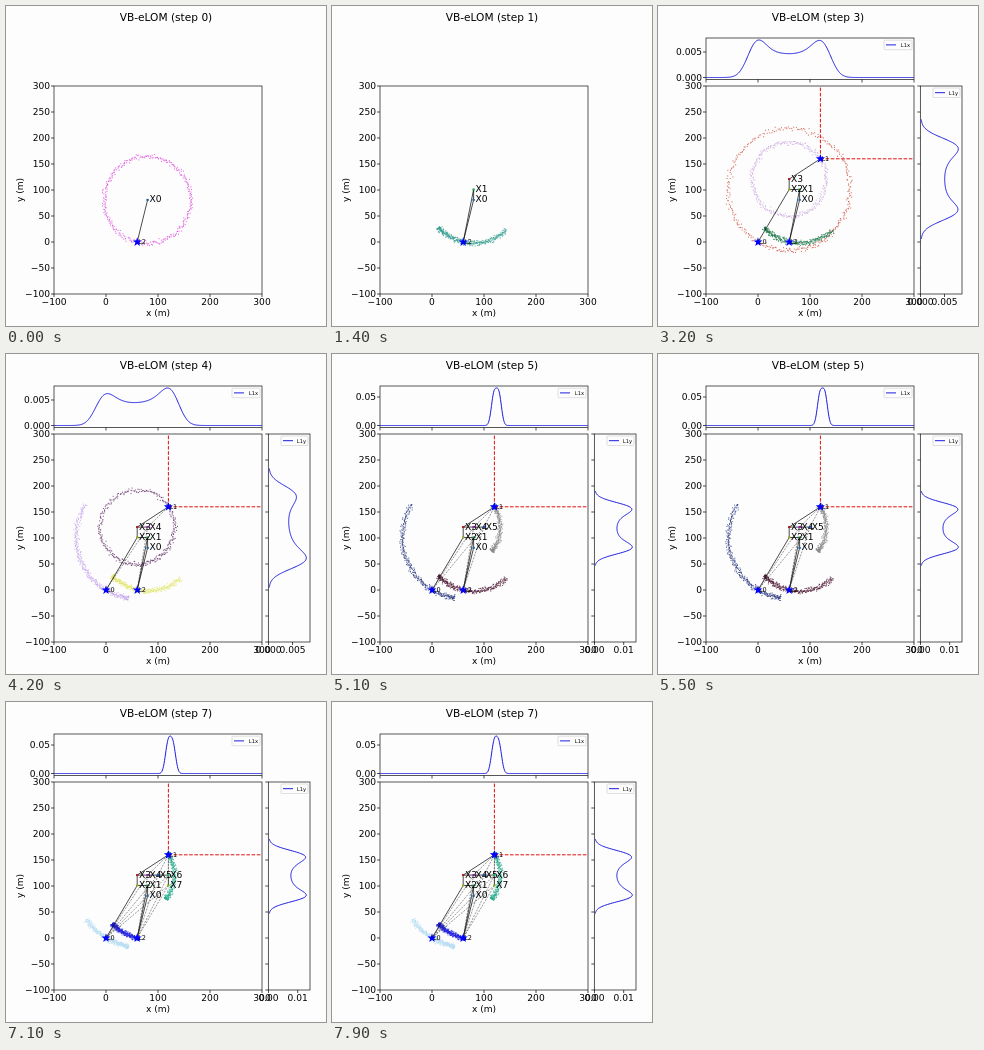
Animation, 320 px wide and 320 px high, one loop 8000 ms. Source, as an HTML page with a canvas:

```html
<!DOCTYPE html>
<html>
<head>
<meta charset="utf-8">
<style>
html, body { margin: 0; width: 100%; height: 100%; overflow: hidden; background: #fdfdfd; }
canvas { display: block; width: 320px; height: 320px; }
</style>
</head>
<body>
<canvas></canvas>
<script>
const LOOP = 8000, STEP_MS = 900, FIRST_MS = 300, LAST_STEP = 7;
const FONT = '"DejaVu Sans", Verdana, sans-serif';
const PAPER = '#fdfdfd', CURVE = '#1c1ce0', RAD = Math.PI / 180;

// world metres to stage pixels
const px = x => 100 + 0.52 * x;
const py = y => 236 - 0.52 * y;

// the robot drives 20 m per step: up, left, up, right ...
const MOVES = { U: [0, 20], D: [0, -20], L: [-20, 0], R: [20, 0] };
let spot = [80, 81];
const poses = [spot];
for (const m of 'ULURRRD') poses.push(spot = spot.map((v, i) => v + MOVES[m][i]));

// each landmark is a ring around the pose that saw it, later an arc, then a shorter arc
const landmarks = [
  { at: [0, 0], seen: 2, arc: 4, settle: 7, from: 98, sweep: 115,
    colors: ['#b4ee3c', '#c8402c', '#c3a0ea', '#22307a', '#a9bda4', '#b4dcf2'] },
  { at: [120, 160], seen: 3, arc: 5, settle: 9, from: -36, sweep: 76, ends: true,
    colors: ['#c9a0dc', '#5a2560', '#8c8c8c', '#e0a030', '#2fae90'] },
  { at: [60, 0], seen: 0, arc: 1, settle: 6, from: 137, sweep: -90,
    colors: ['#d93ad9', '#2a9a8a', '#8a1ee6', '#1f7a4a', '#e2e66a', '#4e1834', '#a8622a', '#1f1fdc'] }
];

const canvas = document.querySelector('canvas');
const c = canvas.getContext('2d');
const scale = window.devicePixelRatio || 1;
canvas.width = canvas.height = 320 * scale;
c.scale(scale, scale);

function seeded(seed) {
  return () => (seed = seed * 16807 % 2147483647) / 2147483647;
}

function text(str, x, y, size = 9.1, align = 'center') {
  c.font = `${size}px ${FONT}`;
  c.textAlign = align;
  c.fillStyle = '#000';
  c.fillText(str, x, y);
}

function path(points, color = '#000', width = 0.7, dash = []) {
  c.beginPath();
  points.forEach(p => c.lineTo(...p));
  c.strokeStyle = color;
  c.lineWidth = width;
  c.setLineDash(dash);
  c.stroke();
  c.setLineDash([]);
}

const toStage = ([x, y]) => [px(x), py(y)];
const link = (a, b, ...style) => path([toStage(a), toStage(b)], ...style);
const label = v => String(v).replace('-', '\u2212');

function frame(x, y, w, h) {
  c.strokeStyle = '#000';
  c.lineWidth = 0.65;
  c.strokeRect(x, y, w, h);
}

function xTick(x, y, str = '') {
  path([[x, y], [x, y + 3]]);
  text(str, x, y + 11);
}

function yTick(x, y, str = '') {
  path([[x - 3, y], [x, y]]);
  text(str, x - 4, y + 3.3, 9.1, 'right');
}

function ticks(gap, draw) {
  for (let v = -100; v <= 300; v += gap) draw(v);
}

function samples(mark, step) {
  const rand = seeded(731 + step * 97 + mark.at[0]);
  const ring = step < mark.arc;
  const [x, y] = poses[mark.seen];
  // the second sighting from 20 m higher moves the arc's centre half way
  const center = [x, y + (mark.seen === 0 && !ring ? 10 : 0)];
  const r = 0.52 * Math.hypot(mark.at[0] - center[0], mark.at[1] - center[1]);
  const [cx, cy] = toStage(center);
  const sweep = mark.sweep * (step < mark.settle ? 1 : 0.42);
  const lean = 0.22 * (step - mark.seen);
  const count = 340;
  return Array.from({ length: count }, (_, i) => {
    const u = (i + rand()) / count;
    let a = u * 2 * Math.PI;
    if (ring) a -= lean * Math.sin(a - 65 * RAD);
    else a = RAD * (mark.from + sweep * (mark.ends ? (1 - Math.cos(Math.PI * u)) / 2 : u ** 1.3));
    const d = r + 2.6 * (rand() + rand() + rand() - 1.5);
    return [cx + d * Math.cos(a), cy + d * Math.sin(a)];
  });
}

function cloud(points, color) {
  c.fillStyle = color;
  c.globalAlpha = 0.8;
  points.forEach(([x, y]) => c.fillRect(x - 0.5, y - 0.5, 1, 1));
  c.globalAlpha = 1;
}

// smoothed histogram with Scott's bandwidth, as [position, height] with a given peak
function density(values, from, to, peak) {
  const n = values.length;
  const mean = values.reduce((s, v) => s + v) / n;
  const sd = Math.sqrt(values.reduce((s, v) => s + (v - mean) ** 2, 0) / n);
  const w = Math.max(2, sd * n ** -0.2);
  const curve = [];
  for (let t = from; t <= to; t += 0.5)
    curve.push([t, values.reduce((s, v) => s + Math.exp(-(((t - v) / w) ** 2) / 2), 0)]);
  const top = Math.max(...curve.map(p => p[1]));
  return curve.map(([t, h]) => [t, h / top * peak]);
}

function legend(str, x, y, w) {
  c.beginPath();
  c.roundRect(x, y, w, 9.5, 1);
  c.fillStyle = PAPER;
  c.fill();
  c.strokeStyle = '#ccc';
  c.lineWidth = 0.6;
  c.stroke();
  path([[x + 2, y + 4.7], [x + 12, y + 4.7]], CURVE, 1);
  text(str, x + w - 2, y + 6.6, 5.2, 'right');
}

function mainAxes() {
  frame(48, 80, 208, 208);
  ticks(100, v => xTick(px(v), 288, label(v)));
  ticks(50, v => yTick(48, py(v), label(v)));
  text('x (m)', 152, 310);
  c.save();
  c.translate(16.7, 184);
  c.rotate(-Math.PI / 2);
  text('y (m)', 0, 0);
  c.restore();
}

function marginals(mark, step) {
  const wide = step < mark.arc;
  const points = samples(mark, step);

  frame(48, 32, 208, 41.5);
  ticks(100, v => xTick(px(v), 73.5));
  yTick(48, wide ? 46 : 43, wide ? '0.005' : '0.05');
  yTick(48, 71.5, wide ? '0.000' : '0.00');
  path(density(points.map(p => p[0]), 48, 256, 37.5).map(([t, h]) => [t, 71.5 - h]), CURVE, 1);
  legend('L1x', 226, 34.2, 28);

  frame(262.3, 80, 41.7, 208);
  ticks(50, v => yTick(262.3, py(v)));
  xTick(262.5, 288, wide ? '0.000' : '0.00');
  xTick(wide ? 286.5 : 291.7, 288, wide ? '0.005' : '0.01');
  const side = density(points.map(p => p[1]), 80, 288, 37.3).filter(p => p[1] > 0.3);
  path(side.map(([t, h]) => [263 + h, t]), CURVE, 1);
  legend('L1y', 275, 82, 27);

  const [x, y] = mark.at;
  link([x, y], [x, 300], '#e01010', 1, [3.6, 1.6]);
  link([x, y], [300, y], '#e01010', 1, [3.6, 1.6]);
}

function edges(step) {
  const seen = poses.slice(0, step + 1);
  path(seen.map(toStage));
  landmarks.filter(m => m.seen <= step).forEach(m => link(poses[m.seen], m.at));
  if (step > 0) link(poses[1], landmarks[2].at);
  // later sightings could belong to any landmark
  seen.slice(4).forEach(p => landmarks.forEach(m => link(p, m.at, '#333', 0.5, [2, 1.2])));
}

function star(mark, i) {
  const [x, y] = toStage(mark.at);
  text('L' + i, x + 1, y + 2.2, 6.5, 'left');
  c.beginPath();
  for (let k = 0; k < 10; k++) {
    const r = k % 2 ? 1.9 : 4.8, a = (k * 36 - 90) * RAD;
    c.lineTo(x + r * Math.cos(a), y + r * Math.sin(a));
  }
  c.fillStyle = '#00f';
  c.fill();
}

function poseMark(pose, i) {
  const [x, y] = toStage(pose);
  c.fillStyle = `hsl(${210 - 70 * i} 70% 40%)`;
  c.fillRect(x - 1.2, y - 1, 2.4, 2);
  text('X' + i, x + 1.8, y + 2.6, 9.1, 'left');
}

function draw(step) {
  c.fillStyle = PAPER;
  c.fillRect(0, 0, 320, 320);
  text(`VB-eLOM (step ${step})`, 160, 14.5, 10.6);
  landmarks.forEach(m => {
    if (step >= m.seen) cloud(samples(m, step), m.colors[step - m.seen]);
  });
  edges(step);
  mainAxes();
  if (step >= landmarks[1].seen) marginals(landmarks[1], step);
  landmarks.forEach((m, i) => step >= m.seen && star(m, i));
  poses.slice(0, step + 1).forEach(poseMark);
}

let shown = -1;
function tick() {
  const t = performance.now() % LOOP;
  const step = Math.min(LAST_STEP, Math.max(0, Math.floor((t - FIRST_MS) / STEP_MS)));
  if (step !== shown) draw(shown = step);
  requestAnimationFrame(tick);
}
tick();
</script>
</body>
</html>
```
